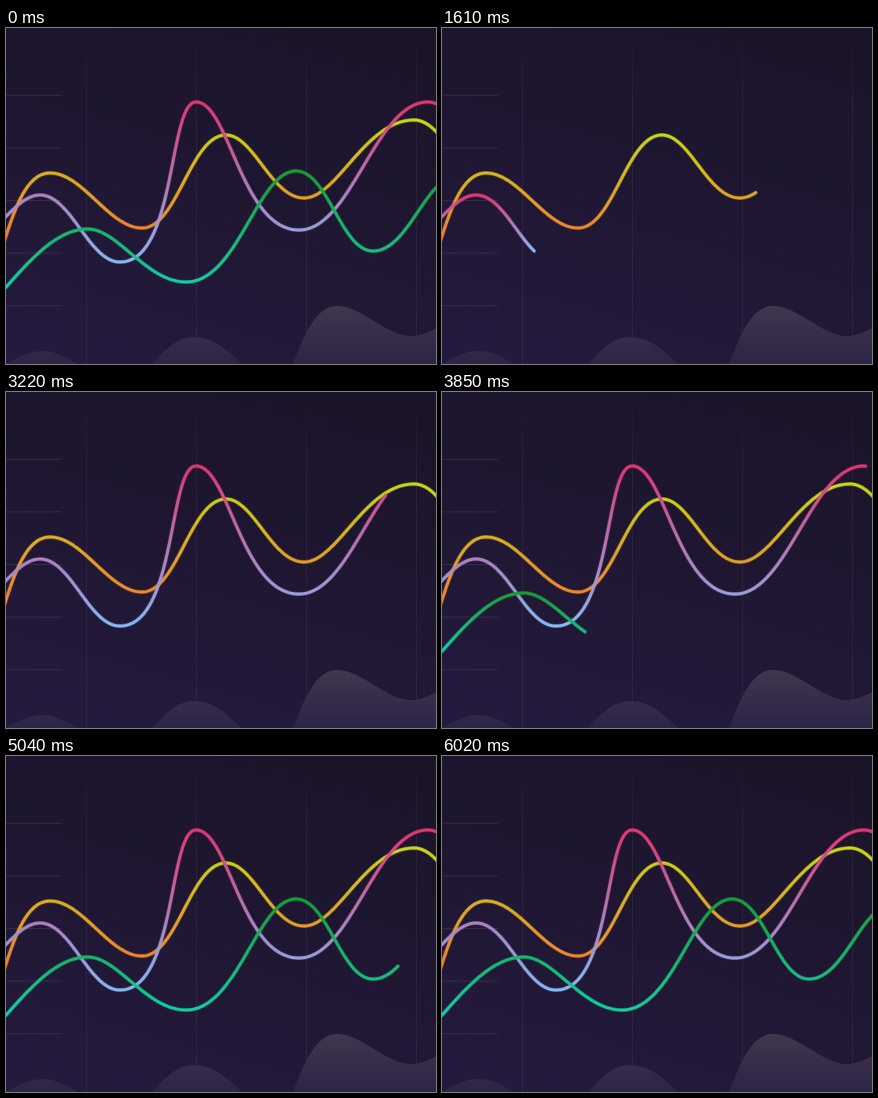
Write an HTML page with a canvas that moves like this. It is 430 by 336 pixels and loops after 6090 ms.

```html
<!DOCTYPE html>
<html lang="en">
<head>
<meta charset="utf-8">
<title>Line chart</title>
<style>
  html, body { margin: 0; width: 430px; height: 336px; overflow: hidden; background: #1e1630; }
  canvas { display: block; width: 430px; height: 336px; }
</style>
</head>
<body>
<canvas id="stage"></canvas>
<script>
const W = 430, H = 336, LOOP = 6090, STEP = 70;
// Every line runs fast over most of its length, then creeps to the end.
const FAST_PART = 0.885, FAST_MS = 1765, SLOW_MS = 930;

const canvas = document.getElementById('stage');
const ctx = canvas.getContext('2d');
const scale = window.devicePixelRatio || 1;
canvas.width = W * scale;
canvas.height = H * scale;
ctx.scale(scale, scale);

// Curves are given by their peaks and troughs: [x, y, lean of the slope leading there].
const lines = [
  {
    delay: 120, top: '#c7d813', bottom: '#f27c30',
    turns: [[-44, 288], [44, 145, -.04], [136, 200], [220, 107], [298, 170, -.03], [408, 92, -.07], [490, 165]]
  },
  {
    delay: 1255, top: '#e03670', bottom: '#88b8f4',
    turns: [[-36, 212], [34, 167], [114, 234], [190, 74, .19], [293, 202, -.12], [422, 74], [500, 150]]
  },
  {
    delay: 3250, top: '#189c38', bottom: '#14d0a4',
    turns: [[-80, 315], [82, 201], [180, 254, -.05], [290, 143, .06], [367, 223], [450, 149, .03]]
  }
];
const hills = [[-35, 348], [36, 323], [116, 360, .05], [188, 309, -.08], [268, 360, .1], [331, 278, -.12], [405, 308], [470, 285]];

const lerp = (a, b, p) => a + (b - a) * p;
const clamp01 = v => Math.min(1, Math.max(0, v));

function cubic(a, b, c, d, t) {
  const u = 1 - t;
  return u * u * u * a + 3 * u * u * t * b + 3 * u * t * t * c + t * t * t * d;
}

// Level tangents at each turn; steeper slopes get longer handles.
function flatten(turns) {
  const pts = [];
  for (let i = 1; i < turns.length; i++) {
    const [x0, y0] = turns[i - 1], [x1, y1, lean = 0] = turns[i];
    const dx = x1 - x0;
    const reach = 0.28 + 0.13 * Math.abs(y1 - y0) / dx;
    const c0 = x0 + (reach + lean) * dx, c1 = x1 - (reach - lean) * dx;
    for (let t = 0; t < 1; t += 1 / 80) {
      pts.push({ x: cubic(x0, c0, c1, x1, t), y: cubic(y0, y0, y1, y1, t) });
    }
  }
  return pts.filter(p => p.x > -2 && p.x < W + 3);
}

for (const line of lines) {
  line.pts = flatten(line.turns);
  line.length = 0;
  line.pts.forEach((p, i) => {
    const last = line.pts[i - 1] || p;
    line.length += Math.hypot(p.x - last.x, p.y - last.y);
    p.len = line.length;
  });
}

function progress(t, delay) {
  if (t < STEP) return 1;
  const fast = clamp01((t - delay) / FAST_MS);
  const slow = clamp01((t - delay - FAST_MS) / SLOW_MS);
  return lerp(0, FAST_PART, fast) + lerp(0, 1 - FAST_PART, slow);
}

function drawnPart({ pts }, len) {
  const next = pts.findIndex(p => p.len >= len);
  if (next < 1) return pts;
  const a = pts[next - 1], b = pts[next];
  const p = (len - a.len) / (b.len - a.len);
  return [...pts.slice(0, next), { x: lerp(a.x, b.x, p), y: lerp(a.y, b.y, p) }];
}

function gradient(x0, y0, x1, y1, ...colors) {
  const g = ctx.createLinearGradient(x0, y0, x1, y1);
  colors.forEach((c, i) => g.addColorStop(i / (colors.length - 1), c));
  return g;
}

function trace(pts) {
  ctx.beginPath();
  pts.forEach(p => ctx.lineTo(p.x, p.y));
}

function drawBackground() {
  ctx.fillStyle = gradient(265, -10, 165, 346, '#1b1429', '#1f1732', '#241a3d');
  ctx.fillRect(0, 0, W, H);

  ctx.fillStyle = gradient(0, 0, 0, 70, 'rgba(255,255,255,0)', 'rgba(255,255,255,.05)');
  for (let i = 0; i < 4; i++) ctx.fillRect(Math.round(80.4 + 109.7 * i), 0, 1, H);
  ctx.fillStyle = 'rgba(255,255,255,.085)';
  for (let i = 0; i < 5; i++) ctx.fillRect(0, 66.8 + 52.6 * i, 56, 1);
}

function drawHills() {
  ctx.fillStyle = gradient(0, 276, 0, 340, '#41374f', '#2c2245');
  trace([{ x: -2, y: 400 }, ...flatten(hills), { x: W + 3, y: 400 }]);
  ctx.fill();
}

// The gradient spans the height of the part drawn so far.
function drawLine(line, t) {
  const len = line.length * progress(t, line.delay);
  if (len <= 0) return;
  const part = drawnPart(line, len);
  const ys = part.map(p => p.y);
  ctx.strokeStyle = gradient(0, Math.min(...ys), 0, Math.max(...ys), line.top, line.bottom);
  ctx.lineCap = ctx.lineJoin = 'round';
  trace(part);
  // A faint wide stroke softens the edge.
  for (const [width, alpha] of [[4.2, .3], [2.9, 1]]) {
    ctx.lineWidth = width;
    ctx.globalAlpha = alpha;
    ctx.stroke();
  }
}

function frame() {
  const t = Math.floor((performance.now() % LOOP) / STEP) * STEP;
  drawBackground();
  drawHills();
  lines.forEach(line => drawLine(line, t));
  requestAnimationFrame(frame);
}
frame();
</script>
</body>
</html>
```
